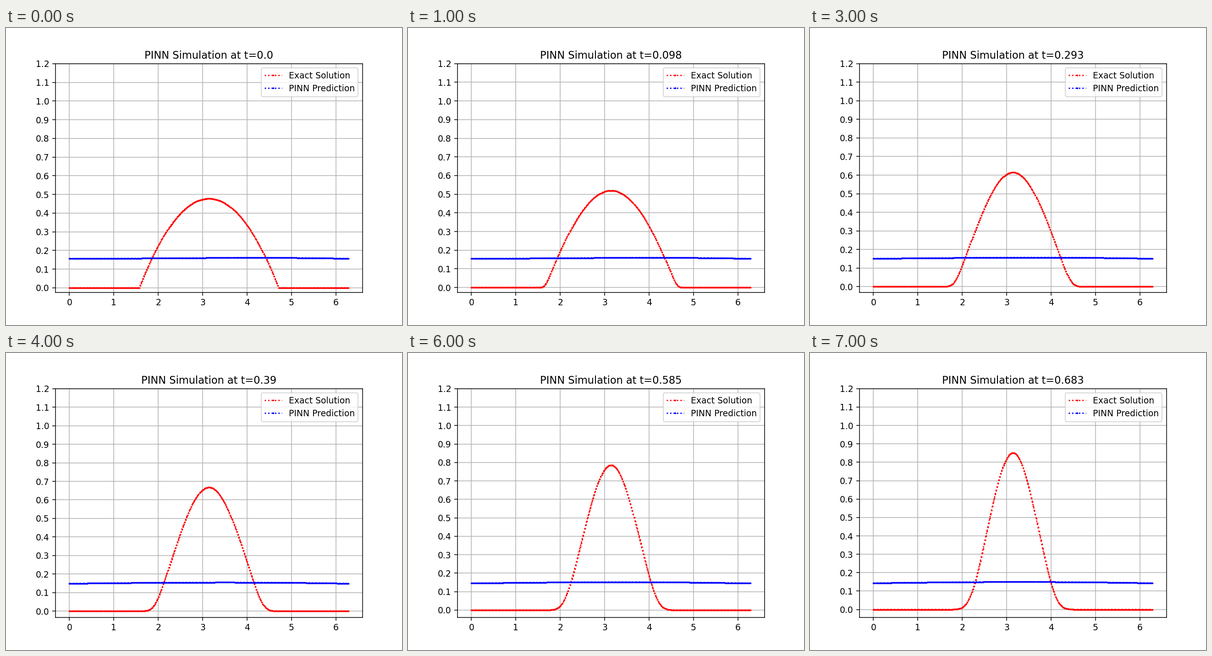
Animation of 864 by 648 pixels, one loop 8000 ms. Source, as a matplotlib script:

```python
import numpy as np
import matplotlib.pyplot as plt
from matplotlib.animation import FuncAnimation

FRAMES = 8
DT = 4 / 41            # model time between frames
SUBSTEPS = 80
CELLS = 600
PULL = 0.887           # drift towards pi
DIFFUSION = 0.02

x = np.linspace(0, 2 * np.pi, CELLS + 1)
u = x / (2 * np.pi)


def solve_density():
    """Drift-diffusion of a parabolic bump on a circle, one row per frame."""
    y = x[:-1]
    dx = y[1]
    h = DT / SUBSTEPS
    drift = PULL * np.sin(y + dx / 2)
    rho = 1.5 / np.pi * np.maximum(0, 1 - ((y - np.pi) / (np.pi / 2)) ** 2)
    rows = [rho]
    for _ in range(FRAMES - 1):
        for _ in range(SUBSTEPS):
            right = np.roll(rho, -1)
            flux = drift * (rho + right) / 2 - DIFFUSION * (right - rho) / dx
            rho = rho - h / dx * (flux - np.roll(flux, 1))
        rows.append(rho)
    return [np.append(r, r[0]) for r in rows]


def prediction(t):
    """Nearly flat curve, skewed to the right at first, then symmetric."""
    shape = u * (1 - u) * (t + 8 * t**2 + u)
    return 0.1565 - 0.0195 * t + (0.005 + 0.003 * t) * shape / shape.max()


density = solve_density()

fig, ax = plt.subplots(figsize=(6.4, 4.8), dpi=135)
style = dict(linestyle=":", marker=".", markersize=2)
exact, = ax.plot(x[::2], density[0][::2], color="red",
                 label="Exact Solution", **style)
guess, = ax.plot(x[::2], prediction(0)[::2], color="blue",
                 label="PINN Prediction", **style)
ax.set_yticks(np.arange(13) / 10)
ax.grid(True)
ax.legend(loc="upper right")
title = ax.set_title("")


def draw(i):
    t = i * DT
    rho = density[i]
    exact.set_ydata(rho[::2])
    guess.set_ydata(prediction(t)[::2])
    ax.set_ylim(-0.05 * rho.max(), 1.2)
    title.set_text(f"PINN Simulation at t={round(t, 3)}")
    return exact, guess, title


anim = FuncAnimation(fig, draw, frames=FRAMES, init_func=lambda: draw(0),
                     interval=1000, repeat=True, repeat_delay=0)
plt.show()
```
